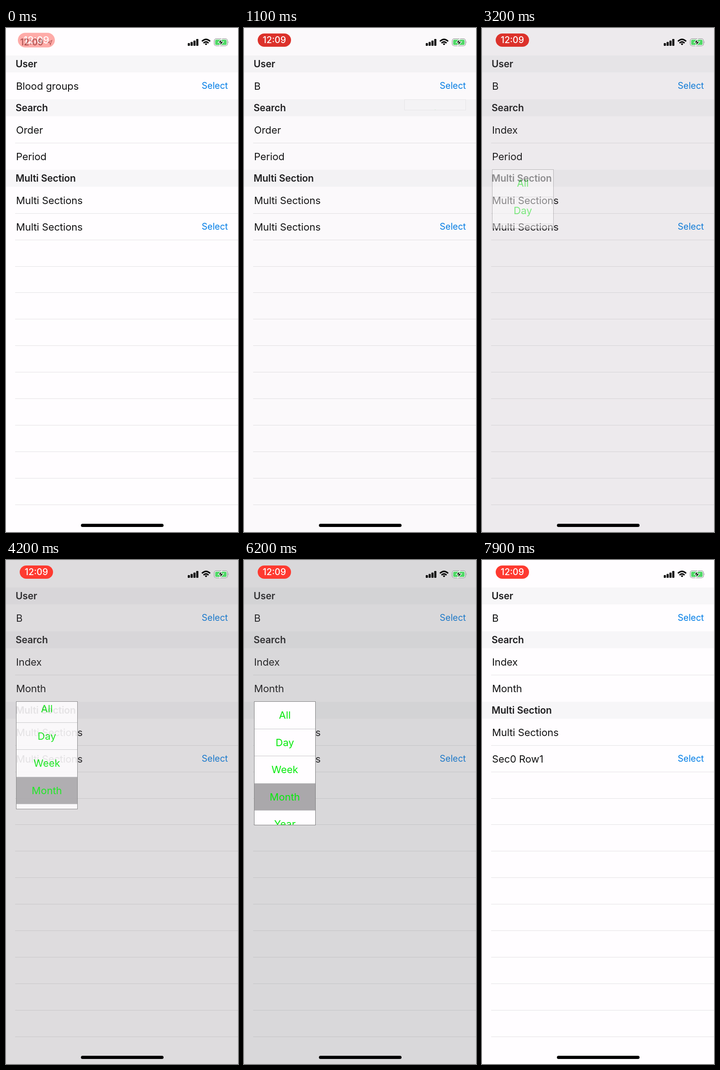
Write an HTML page that moves like this. It is 508x1102 px and loops after 8000 ms.

```html
<!DOCTYPE html>
<html lang="en">
<head>
<meta charset="utf-8">
<title>Drop-down menus</title>
<style>
  html, body { margin: 0; width: 100%; height: 100%; overflow: hidden; background: #fffdff; }
  body { position: relative; font: 22px Inter, "Open Sans", sans-serif; color: #121213; }
  div, svg { position: absolute; box-sizing: border-box; }
  #stage { left: 0; top: 0; width: 508px; height: 1102px; overflow: hidden; background: #fffdff; }
  .label { line-height: 40px; white-space: pre; letter-spacing: -0.1px; }
  .title { font-size: 21px; font-weight: 600; color: #1c1c1e; }
  .button { font-size: 19.5px; color: #007de6; letter-spacing: 0; }
  .band { left: 0; width: 508px; background: #f7f6f8; }
  .line { left: 20px; width: 488px; height: 1px; background: #e3e2e4; }
  #dim { inset: 0; background: rgb(110, 108, 112); }
  .menu { width: 135px; overflow: hidden; background: #fffdff; border: 1px solid #7f7e80; }
  .list { left: 0; top: 0; width: 100%; }
  .item { left: 0; width: 100%; height: 59.6px; line-height: 59.6px; text-align: center;
          color: #06ea0c; border-bottom: 1px solid #c8c7ca; white-space: pre; }
  .item.on { background: #aaa8ab; }
  .clock { font-size: 19.5px; font-weight: 500; line-height: 29px; }
  #pill { left: 30px; top: 12px; width: 73px; height: 29px; border-radius: 14.5px;
          text-align: center; color: #fff; }
  #plain { left: 0; top: 0; color: #4a3035; }
  #home { left: 164px; top: 1084px; width: 181px; height: 7px; border-radius: 4px; background: #000; }
</style>
</head>
<body>
<div id="stage">
  <div id="page"></div>
  <div id="dim"></div>
  <div id="menus"></div>
  <svg width="508" height="60" viewBox="0 0 508 60">
    <g>
      <rect x="398" y="33" width="4.6" height="6" rx="1.2"/>
      <rect x="404.2" y="30.5" width="4.6" height="8.5" rx="1.2"/>
      <rect x="410.4" y="27.5" width="4.6" height="11.5" rx="1.2"/>
      <rect x="416.6" y="24" width="4.6" height="15" rx="1.2"/>
    </g>
    <g fill="none" stroke="#000" stroke-width="3">
      <path d="M429 29.2Q438 20.6 447 29.2"/>
      <path d="M432.4 33Q438 27.8 443.6 33"/>
      <path d="M435.2 34.8Q438 32.4 440.8 34.8L438 37.8Z" fill="#000" stroke="none"/>
    </g>
    <rect x="456" y="23.5" width="29" height="15.5" rx="4.5" fill="#fffdff" stroke="#87868a" stroke-width="1.2"/>
    <rect x="458" y="25.5" width="25" height="11.5" rx="2.6" fill="#4fd866"/>
    <path d="M486.6 28.6q1.8 2.6 0 5.2z" fill="#87868a"/>
    <path d="M472.5 23.5L464.5 32H469.5L467.5 39.5L476.5 30H471Z" stroke="#fff" stroke-width="1.2"/>
  </svg>
  <div id="plain">
    <div class="clock" style="left:31px;top:17px">12:09</div>
    <svg width="110" height="50"><path d="M92 31.5L100.5 27L97 36.5L96 32Z" fill="none" stroke="#6d454a" stroke-width="1.3"/></svg>
  </div>
  <div id="pill" class="clock">12:09</div>
  <div id="home"></div>
</div>
<script>
const LOOP = 8000, FADE = 300, ROW = 59.6;
const $ = id => document.getElementById(id);

function add(parent, cls, style = {}, text = "") {
  const el = document.createElement("div");
  el.className = cls;
  el.textContent = text;
  for (const k in style) el.style[k] = typeof style[k] === "number" ? style[k] + "px" : style[k];
  parent.append(el);
  return el;
}

const page = $("page");
const label = (x, y, text, cls = "") => add(page, "label " + cls, { left: x, top: y - 20 }, text);

// Table
for (const [y, h, text] of [[60, 37, "User"], [156, 37, "Search"], [310, 37, "Multi Section"]]) {
  add(page, "band", { top: y, height: h });
  label(21, y + 18.5, text, "title");
}
add(page, "line", { top: 251 });
add(page, "line", { top: 405 });
for (let i = 0; i < 11; i++) add(page, "line", { top: Math.round(462.6 + i * 57.93) });
for (const y of [126, 434]) add(page, "label button", { right: -486, top: y - 20 }, "Select");

const fields = {
  blood: [126.5, "Blood groups"],
  order: [222.5, "Order"],
  period: [280.5, "Period"],
  multi: [376.5, "Multi Sections"],
  multi2: [434.5, "Multi Sections"]
};
for (const k in fields) {
  const [y, text] = fields[k];
  fields[k] = { text, el: label(22, y, text) };
}

// Each menu opens, has a row picked and closes at once; was = row already picked.
const blood = ["A", "B", "O", "AB"];
const orders = ["Best", "Recent", "Index", "Popular"];
const periods = ["All", "Day", "Week", "Month", "Year"];
const sections = ["Sec0 Row0", "Sec0 Row1", "Sec0 Row2", "Sec1 Row0", "Sec1 Row1"];
const menus = [
  { field: "blood", x: 351, y: 156, rows: blood, open: 250, close: 860, pick: 1 },
  { field: "order", x: 22, y: 251, rows: orders, open: 1700, close: 2560, pick: 2 },
  { field: "period", x: 22, y: 309, rows: periods, open: 3055, close: 4134, pick: 3, scroll: 14 },
  { field: "order", x: 22, y: 251, rows: orders, open: 4750, close: 5350, pick: 2, was: 2 },
  { field: "period", x: 22, y: 309, rows: periods, open: 5750, close: 6380, pick: 3, was: 3 },
  { field: "multi2", x: 351, y: 463, rows: sections, open: 6880, close: 7450, pick: 1 }
];
for (const m of menus) {
  m.height = Math.min(271, m.rows.length * ROW + 0.6);
  m.el = add($("menus"), "menu", { left: m.x, top: m.y });
  m.list = add(m.el, "list");
  m.items = m.rows.map((r, i) => add(m.list, "item", { top: i * ROW }, r));
}

const ease = (t, start, span) => {
  const u = Math.min(1, Math.max(0, (t - start) / span));
  return u * u * (3 - 2 * u);
};

function render(t) {
  let dim = 0;
  for (const k in fields) fields[k].now = fields[k].text;

  for (const m of menus) {
    const p = ease(t, m.open, FADE) - ease(t, m.close, FADE);
    const picked = t >= m.close;
    dim = Math.max(dim, p);
    if (picked) fields[m.field].now = m.rows[m.pick];
    m.el.style.display = p > 0.002 ? "" : "none";
    m.el.style.opacity = p;
    m.el.style.height = m.height * p + "px";
    m.list.style.top = -(m.scroll || 0) * ease(t, m.open + 450, 250) + "px";
    const on = picked ? m.pick : m.was;
    m.items.forEach((el, i) => el.classList.toggle("on", i === on));
  }

  for (const k in fields) {
    const f = fields[k];
    if (f.el.textContent !== f.now) f.el.textContent = f.now;
  }
  $("dim").style.opacity = 0.26 * dim;

  // Recording pill: appears, then pulses
  const show = ease(t, -60, 200);
  const glow = 0.5 - 0.5 * Math.cos((t - 1150) / 2050 * 2 * Math.PI);
  const dark = t < 140 ? 0 : Math.max(0, 1 - glow * 1.6);
  const pill = $("pill").style;
  pill.background = `rgb(${254 - 34 * dark}, ${58 - 8 * dark}, ${48 - 5 * dark})`;
  pill.opacity = t < 140 ? 0.25 + 0.75 * show : 1;
  pill.transform = `scale(${1 + 0.14 * (1 - show)})`;
  $("plain").style.opacity = 1 - show;
}

const start = performance.now();
function tick() {
  render((performance.now() - start) % LOOP);
  requestAnimationFrame(tick);
}
tick();
</script>
</body>
</html>
```
